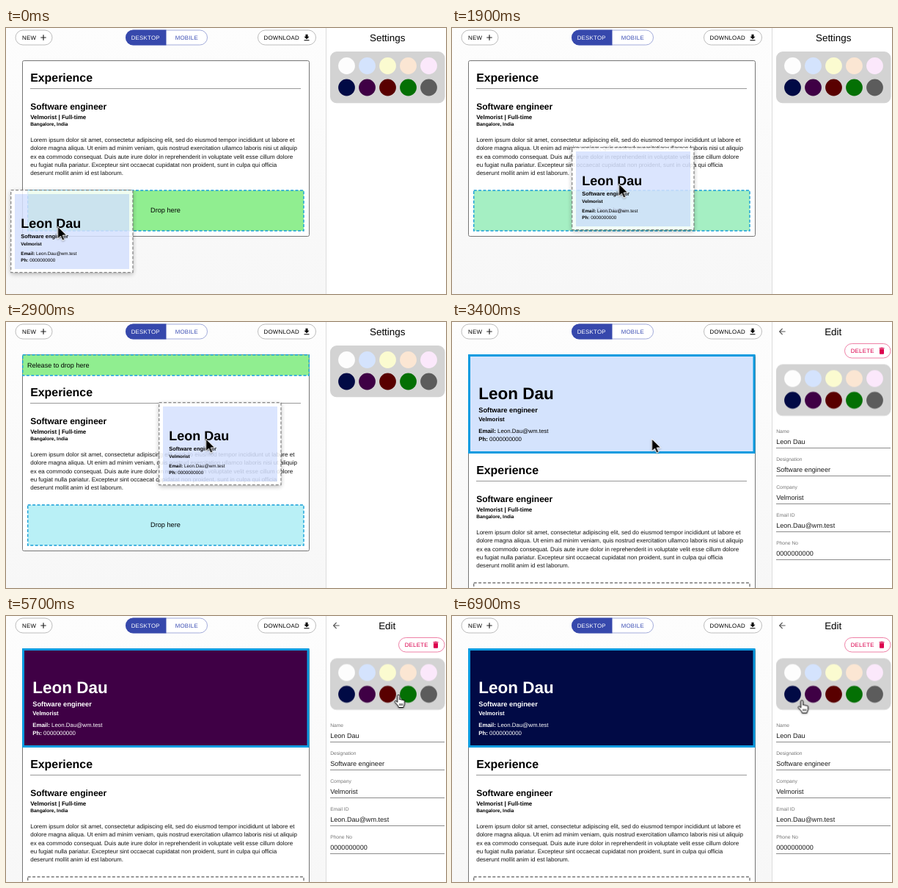
Write an HTML page that moves like this. It is 600 px wide and 362 px high and loops after 7 s.

```html
<!DOCTYPE html>
<html lang="en">
<head>
<meta charset="utf-8">
<title>Resume builder</title>
<style>
  html, body { margin: 0; width: 100%; height: 100%; overflow: hidden; background: #fff; }
  svg { display: block; width: 600px; height: 362px; }
  text { font-family: "Liberation Sans", Arial, sans-serif; text-rendering: geometricPrecision; white-space: pre; }
  .b { font-weight: 700; }
  .btn { font-size: 7.9px; letter-spacing: .23px; }
  .pill { fill: #fff; stroke: #bdbdbd; }
  .title { font-size: 13.4px; text-anchor: middle; }
  .zone { stroke: #179fd8; stroke-width: 1.4; stroke-dasharray: 4 2.4; }
  .label { font-size: 6.7px; fill: #757575; }
  .value { font-size: 9.1px; fill: #1a1a1a; }
</style>
</head>
<body>
<svg viewBox="0 0 600 362">
  <defs>
    <linearGradient id="page" x2="0" y2="1">
      <stop stop-color="#fdfdfd"/><stop offset="1" stop-color="#f7f7f7"/>
    </linearGradient>
    <filter id="shadow" x="-20%" y="-20%" width="140%" height="150%">
      <feDropShadow dx="0" dy="2" stdDeviation="3" flood-opacity=".35"/>
    </filter>
    <filter id="soft" x="-50%" y="-50%" width="200%" height="200%">
      <feDropShadow dx="0" dy="1" stdDeviation=".8" flood-opacity=".35"/>
    </filter>
    <g id="person">
      <text class="b" font-size="22.5">Leon Dau</text>
      <text class="b" y="17.7" font-size="9.3">Software engineer</text>
      <text class="b" y="30" font-size="7.9">Velmorist</text>
      <text y="46.2" font-size="7.9"><tspan class="b">Email:</tspan> Leon.Dau@wm.test</text>
      <text y="57.4" font-size="7.9"><tspan class="b">Ph:</tspan> 0000000000</text>
    </g>
  </defs>

  <rect width="436" height="362" fill="url(#page)"/>

  <!-- toolbar -->
  <rect class="pill" x="13" y="3" width="50" height="20" rx="10"/>
  <text class="btn" x="22" y="16">NEW</text>
  <path d="M47.3 13h7.4M51 9.3v7.4" stroke="#222" stroke-width="1.2"/>
  <rect x="163.5" y="3" width="111" height="20" rx="10" fill="#fff" stroke="#a3acdb"/>
  <path d="M218.500 2.500V23.500H173.500a10.500 10.500 0 0 1 0-21z" fill="#3648ac"/>
  <text class="btn" x="170.700" y="16" fill="#fff">DESKTOP</text>
  <text class="btn" x="230.700" y="16" fill="#3f51b5">MOBILE</text>
  <rect class="pill" x="343.500" y="3" width="79" height="20" rx="10"/>
  <text class="btn" x="351.500" y="16">DOWNLOAD</text>
  <path transform="translate(404 7.200) scale(.5)" d="M19 9h-4V3H9v6H5l7 7 7-7zM5 18v2h14v-2H5z"/>

  <!-- document -->
  <rect id="doc" x="22.500" y="44.500" width="391" height="239" rx="2" fill="#fff" stroke="#757575"/>
  <g id="content">
    <text class="b" x="33.200" y="73" font-size="15.900">Experience</text>
    <path d="M33 82.500H402" stroke="#999"/>
    <text class="b" x="33.200" y="111" font-size="12">Software engineer</text>
    <text class="b" x="33.200" y="124" font-size="8">Velmorist | Full-time</text>
    <text class="b" x="33.200" y="133.300" font-size="6.600">Bangalore, India</text>
    <g id="lorem" font-size="8.040" fill="#111"></g>
    <rect id="zone" class="zone" x="29.700" y="221" width="376.300" height="55" fill="#90ee90"/>
    <text x="197" y="251.300" font-size="9.200">Drop here</text>
  </g>
  <g id="release" opacity="0">
    <rect class="zone" x="22.700" y="44.700" width="390.600" height="28" fill="#90ee90"/>
    <text x="29" y="61.700" font-size="9.050">Release to drop here</text>
  </g>
  <g id="header" opacity="0">
    <rect id="tint" x="23.500" y="45.500" width="388.500" height="132" stroke="#0a9be0" stroke-width="3"/>
    <use id="ink" href="#person" x="36.200" y="105"/>
  </g>

  <!-- side panel -->
  <path d="M436 0h164v362H436z" fill="#fff"/>
  <path d="M436.500 0V362" stroke="#dcdcdc"/>
  <g id="palette">
    <rect x="442" y="32" width="156.500" height="70.300" rx="9" fill="#d3d3d3"/>
  </g>
  <text id="settings" class="title" x="520.200" y="17.500">Settings</text>
  <g id="edit" opacity="0">
    <text class="title" x="519.700" y="17.500">Edit</text>
    <path transform="translate(443.600 6.400) scale(.55)" fill="#555" d="M20 11H7.830l5.590-5.590L12 4l-8 8 8 8 1.410-1.410L7.830 13H20z"/>
    <rect x="535.500" y="29.500" width="62.500" height="19.500" rx="9.750" fill="#fff" stroke="#ee80a6"/>
    <text class="btn" x="543.700" y="42.200" fill="#dc004e">DELETE</text>
    <path transform="translate(580 33.200) scale(.5)" fill="#dc004e" d="M6 19c0 1.100.9 2 2 2h8c1.100 0 2-.9 2-2V7H6zM19 4h-3.500l-1-1h-5l-1 1H5v2h14z"/>
  </g>

  <!-- dragged card and pointer -->
  <g id="card">
    <g opacity=".86">
      <rect x=".7" y=".7" width="166.300" height="112" fill="#fff" filter="url(#shadow)"/>
      <rect x=".7" y=".7" width="166.300" height="112" fill="none" stroke="#777" stroke-width="1.300" stroke-dasharray="4 2.400"/>
      <rect x="6" y="6" width="156" height="102" fill="#d6e1fe"/>
    </g>
    <use href="#person" transform="translate(14.300 51.600) scale(.8)"/>
  </g>
  <g id="pointer" filter="url(#soft)" stroke-linejoin="round">
    <path id="arrow" d="M0 0V17l4-3.800 2.600 6 2.800-1.200-2.600-5.900h5.400z" stroke="#fff"/>
    <g id="hand" opacity="0" fill="#fff" stroke="#000">
      <path d="M4.200 10.400V1.800a1.500 1.500 0 0 1 3 0V7a1.300 1.300 0 0 1 2.400.4 1.300 1.300 0 0 1 2.300.6 1.200 1.200 0 0 1 2.100.9v3.600c0 2-1.400 3-1.600 5H6C5.600 15 2.600 12.600.8 10.300 0 9 1.500 8 2.600 8.900z"/>
      <path d="M7.300 12v3M9.200 12v3M11.100 12v3" stroke-width=".8"/>
    </g>
  </g>
</svg>

<script>
  const LOOP = 7000, TICK = 100;
  const $ = id => document.getElementById(id);
  const at = (x, y) => `translate(${x}px, ${y}px)`;

  function add(parent, tag, attrs, text = "") {
    const el = document.createElementNS("http://www.w3.org/2000/svg", tag);
    for (const k in attrs) el.setAttribute(k, attrs[k]);
    el.textContent = text;
    parent.append(el);
  }

  [
    "Lorem ipsum dolor sit amet, consectetur adipiscing elit, sed do eiusmod tempor incididunt ut labore et",
    "dolore magna aliqua. Ut enim ad minim veniam, quis nostrud exercitation ullamco laboris nisi ut aliquip",
    "ex ea commodo consequat. Duis aute irure dolor in reprehenderit in voluptate velit esse cillum dolore",
    "eu fugiat nulla pariatur. Excepteur sint occaecat cupidatat non proident, sunt in culpa qui officia",
    "deserunt mollit anim id est laborum."
  ].forEach((line, i) => add($("lorem"), "text", { x: 33.2, y: 155.3 + i * 11.15 }, line));

  ["#fdfdfd", "#d4e3fd", "#fbfbd0", "#fbe6d3", "#fbe8fb",
   "#010a45", "#3f0045", "#590000", "#047004", "#5c5c5c"].forEach((fill, i) =>
    add($("palette"), "circle", { cx: 464.5 + i % 5 * 28, cy: i < 5 ? 51.5 : 81, r: 11.4, fill }));

  [["Name", "Leon Dau"], ["Designation", "Software engineer"], ["Company", "Velmorist"],
   ["Email ID", "Leon.Dau@wm.test"], ["Phone No", "0000000000"]].forEach(([label, value], i) => {
    const y = i * 38, edit = $("edit");
    add(edit, "text", { class: "label", x: 442.2, y: 151.3 + y }, label);
    add(edit, "text", { class: "value", x: 442.2, y: 165.8 + y }, value);
    add(edit, "path", { d: `M442 ${171.5 + y}H598`, stroke: "#8c8c8c" });
  });

  // Points are [ms, value]; moves advance once per tick, holds jump at each point.
  function track(id, prop, points, moving) {
    const all = [...points, [LOOP, points[points.length - 1][1]]];
    const frames = all.map(([t, v], i) => {
      const next = all[i + 1];
      const n = moving && next ? (next[0] - t) / TICK : 1;
      return { offset: t / LOOP, [prop]: v, easing: `steps(${n})` };
    });
    $(id).animate(frames, { duration: LOOP, iterations: Infinity });
  }
  const hold = (id, prop, ...points) => track(id, prop, points, false);
  const move = (id, prop, ...points) => track(id, prop, points, true);

  const drag = [[0, 6, 220], [900, 6, 220], [1200, 22, 220], [1700, 95, 193],
    [1900, 163, 162], [2300, 202, 118], [2900, 208, 109]];
  const DROP = 3000;

  move("card", "transform", ...drag.map(([t, x, y]) => [t, at(x, y)]));
  hold("card", "opacity", [0, 1], [DROP, 0]);
  move("pointer", "transform",
    ...drag.map(([t, x, y]) => [t, at(x + 64.5, y + 50)]),
    [3500, at(272.5, 159)], [4200, at(470, 104)], [4600, at(502, 114.5)], [4900, at(502, 114.5)],
    [5700, at(529.5, 107)], [5900, at(529.5, 107)], [6900, at(471.5, 114.5)]);
  hold("arrow", "opacity", [0, 1], [4100, 0]);
  hold("hand", "opacity", [0, 0], [4100, 1]);

  hold("doc", "height", [0, "239px"], [2400, "267px"], [DROP, "400px"]);
  hold("content", "transform", [0, at(0, 0)], [2400, at(0, 28)], [DROP, at(0, 134)]);
  hold("release", "opacity", [0, 0], [2400, 1], [DROP, 0]);
  move("zone", "fill", [0, "#90ee90"], [1800, "#90ee90"], [2000, "#b9f0f6"], [2900, "#b9f0f6"], [DROP, "#fff"]);
  hold("zone", "stroke", [0, "#179fd8"], [DROP, "#777"]);

  hold("header", "opacity", [0, 0], [DROP, 1]);
  hold("tint", "fill", [0, "#d4e3fd"], [4700, "#3f0045"], [5800, "#590000"], [6800, "#010a45"]);
  hold("ink", "fill", [0, "#000"], [4700, "#fff"]);
  hold("palette", "transform", [0, at(0, 0)], [DROP, at(0, 25.5)]);
  hold("settings", "opacity", [0, 1], [DROP, 0]);
  hold("edit", "opacity", [0, 0], [DROP, 1]);
</script>
</body>
</html>
```
